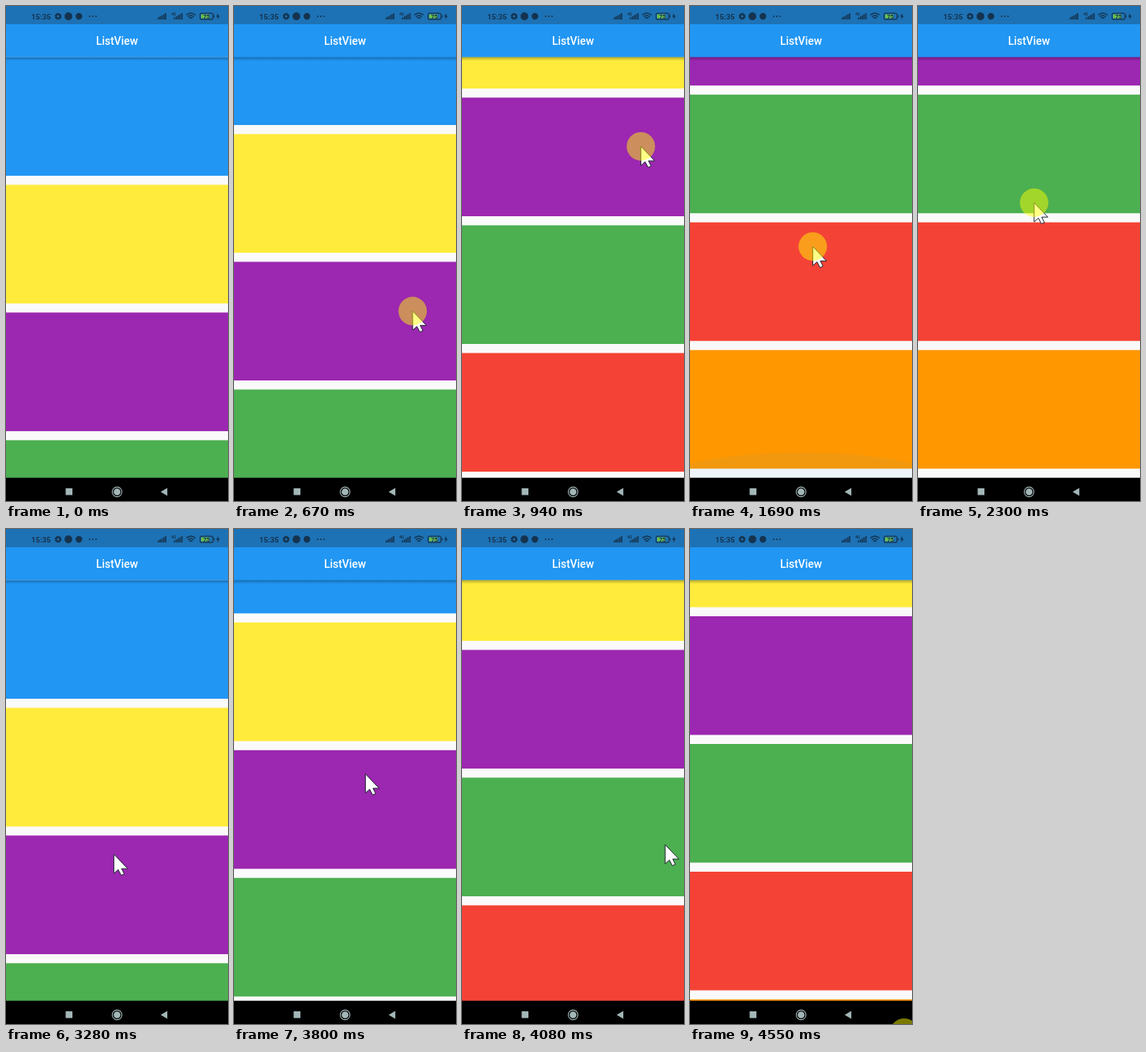
An HTML page for the animation above (4690 ms loop, 281 by 624 pixels).

```html
<!DOCTYPE html>
<html lang="en">
<head>
<meta charset="utf-8">
<title>ListView</title>
<style>
  html, body { margin: 0; width: 100%; height: 100%; overflow: hidden; background: #000; }
  svg { display: block; width: 100%; height: 100%; }
  text { font-family: Roboto, "Noto Sans", sans-serif; }
</style>
</head>
<body>
<svg viewBox="0 0 281 624" xmlns="http://www.w3.org/2000/svg">
  <defs>
    <linearGradient id="shade" x1="0" y1="0" x2="0" y2="1">
      <stop offset="0" stop-opacity=".34"/>
      <stop offset=".45" stop-opacity=".14"/>
      <stop offset="1" stop-opacity="0"/>
    </linearGradient>
  </defs>

  <rect width="281" height="624" fill="#fafafa"/>
  <g id="list"></g>
  <ellipse id="glow" cx="140.5" cy="615" rx="211" ry="52" fill="#2196f3" opacity="0"/>

  <rect y="64.4" width="281" height="5" fill="url(#shade)"/>
  <rect width="281" height="64.4" fill="#2196f3"/>
  <rect width="281" height="23" fill="#1d72b5"/>
  <text x="140.5" y="48.5" font-size="13.9" font-weight="500" fill="#fff" text-anchor="middle">ListView</text>

  <g id="status" fill="#15334e">
    <text x="32" y="16.6" font-size="9.6" font-weight="700">15:35</text>
    <circle cx="66" cy="13" r="2.7" fill="none" stroke="#15334e" stroke-width="2.2"/>
    <circle cx="66" cy="13" r="3.9" fill="none" stroke="#15334e" stroke-width="1" stroke-dasharray="1.6 1.463"/>
    <circle cx="79" cy="13" r="4.9"/>
    <circle cx="92.3" cy="13" r="4.2"/>
    <circle cx="106" cy="13" r="1"/>
    <circle cx="110" cy="13" r="1"/>
    <circle cx="114" cy="13" r="1"/>
    <text x="209.3" y="11.6" font-size="4.6" font-weight="700">4G</text>
    <g fill="none" stroke="#15334e" stroke-width="1.4">
      <path d="M228.2 11.4Q234 6.6 239.8 11.4M230.2 13.6Q234 10.4 237.8 13.6M232 15.6Q234 14 236 15.6"/>
      <rect x="245.6" y="9.1" width="16.4" height="7.8" rx="2" stroke-width="1.1"/>
    </g>
    <rect x="247" y="10.4" width="10.6" height="5.2" rx=".6" fill="#6cc04a"/>
    <rect x="262.6" y="11.3" width="1.2" height="3.4" rx=".5"/>
    <text x="253.8" y="15.7" font-size="7.4" font-weight="700" text-anchor="middle">75</text>
    <path d="M269 8.8L265.9 13.6H268L267.4 17.2L270.6 12.2H268.5Z"/>
  </g>

  <rect y="594.7" width="281" height="30"/>
  <g fill="#a3b7b8">
    <rect x="75.5" y="608" width="8.6" height="8.6" rx=".6"/>
    <circle cx="140.6" cy="612.5" r="4.3"/>
    <circle cx="140.6" cy="612.5" r="6.1" fill="none" stroke="#a3b7b8" stroke-width="1.1"/>
    <path d="M195.8 612.5L204.2 607.6V617.4Z"/>
  </g>

  <g id="cursor">
    <path d="M0 0V24.2L5.4 19.4L9.2 26.6L13 24.8L9.6 18.2H17.4Z" fill="#fff" stroke="#1c2430" stroke-width="1" stroke-linejoin="round"/>
    <circle id="touch" r="18" fill="#ff0" fill-opacity=".48"/>
  </g>
</svg>
<script>
const LOOP = 4690, STEP = LOOP / 70;
const TOP = 64.4, BOTTOM = 594.7, ITEM = 149.55, PITCH = 161;
const COLORS = ['#2196f3', '#ffeb3b', '#9c27b0', '#4caf50', '#f44336', '#ff9800'];
const END = TOP + COLORS.length * PITCH - BOTTOM;
const $ = id => document.getElementById(id);
const [list, glow, cursor, touch] = ['list', 'glow', 'cursor', 'touch'].map($);

function addRect(parent, x, y, width, height, fill) {
  const el = document.createElementNS('http://www.w3.org/2000/svg', 'rect');
  for (const [k, v] of Object.entries({ x, y, width, height, fill })) el.setAttribute(k, v);
  parent.append(el);
}
COLORS.forEach((c, i) => addRect(list, 0, TOP + i * PITCH, 281, ITEM, c));
for (const x of [192, 212.5])
  for (let i = 0; i < 5; i++) {
    const h = 2.6 + i * 1.35;
    addRect($('status'), x + i * 2.35, 17 - h, 1.6, h, '#15334e');
  }

// Key points [time, values...], eased from one to the next
const SCROLL = [[480, 0], [1267, END], [2278, END], [2715, 0], [3470, 0], [4290, 276.4]];
const GLOW = [[1482, 0], [1675, .06], [2100, 0]];
// [time, x, y, pressed until the next point]
const POINTER = [
  [67, 258, 650, 0], [400, 226, 461, 1], [480, 226, 461, 1],
  [1102, 226.5, 118, 0], [1482, 154, 385, 1],
  [1890, 157, 207, 0], [2200, 148.8, 227.5, 1],
  [2613, 129.3, 446.3, 0], [2980, 150, 245, 1],
  [3200, 138, 410, 0], [3440, 133, 410, 1],
  [3819, 166.3, 308.7, 0], [4250, 300, 440, 0], [4489, 300, 640, 0], [4556, 271, 635, 1]
];

const smooth = p => p * p * (3 - 2 * p);

function at(keys, t) {
  const a = keys.findLast(k => k[0] <= t) || keys[0];
  const b = keys.find(k => k[0] > t) || a;
  const p = a === b ? 0 : smooth((t - a[0]) / (b[0] - a[0]));
  return a.slice(1).map((v, i) => v + (b[i + 1] - v) * p);
}

function draw(time) {
  const t = Math.floor(time / STEP + .3) * STEP;
  const [x, y] = at(POINTER, t);
  const pressed = (POINTER.findLast(k => k[0] <= t) || POINTER[0])[3];
  list.setAttribute('transform', `translate(0 ${-at(SCROLL, t)[0]})`);
  glow.setAttribute('opacity', at(GLOW, t)[0]);
  cursor.setAttribute('transform', `translate(${x} ${y})`);
  touch.setAttribute('opacity', pressed);
}

const begin = performance.now();
function tick() {
  draw((performance.now() - begin) % LOOP);
  requestAnimationFrame(tick);
}
tick();
</script>
</body>
</html>
```
